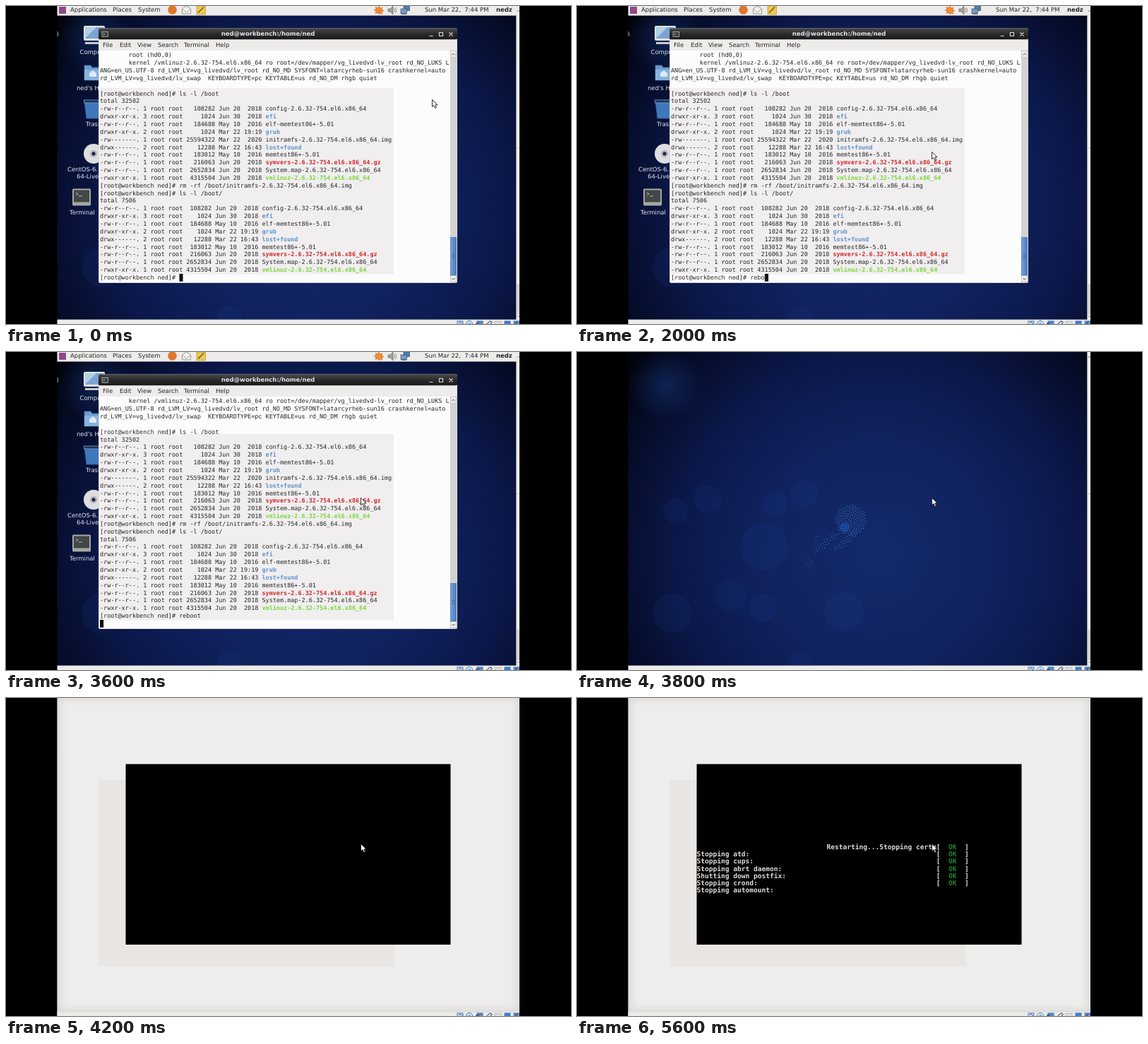
These frames come from a looping animation (800x450 px, 8 s). An HTML page:

```html
<!DOCTYPE html>
<html lang="en">
<head>
<meta charset="utf-8">
<title>Reboot from a terminal</title>
<style>
  html, body { margin: 0; width: 100%; height: 100%; overflow: hidden; background: #000; }
  svg { display: block; width: 800px; height: 450px; }
  text { white-space: pre; text-rendering: geometricPrecision; }
  .ui { font: 8.48px "DejaVu Sans", sans-serif; fill: #262626; }
  .label { fill: #e4e6ee; }
  .bold { font-weight: bold; }
  .term { font: 8.488px "DejaVu Sans Mono", monospace; fill: #262626; }
  .dir { fill: #5d95cc; font-weight: bold; }
  .gz { fill: #d02a2a; font-weight: bold; }
  .exe { fill: #78d838; font-weight: bold; }
  .tty { font: bold 9.55px "DejaVu Sans Mono", monospace; fill: #dcdcdc; }
  .ok { fill: #23802a; }
</style>
</head>
<body>
<svg id="stage" viewBox="0 0 800 450" xmlns="http://www.w3.org/2000/svg">
  <defs>
    <radialGradient id="sky" gradientUnits="userSpaceOnUse" cx="425" cy="285" r="430">
      <stop offset="0" stop-color="#142a6c"/>
      <stop offset=".35" stop-color="#112360"/>
      <stop offset=".65" stop-color="#0b184a"/>
      <stop offset=".88" stop-color="#050c28"/>
      <stop offset="1" stop-color="#02040f"/>
    </radialGradient>
    <radialGradient id="glow">
      <stop offset="0" stop-color="#1d4596" stop-opacity=".4"/>
      <stop offset="1" stop-color="#1d4596" stop-opacity="0"/>
    </radialGradient>
    <linearGradient id="bar" x2="0" y2="1">
      <stop offset="0" stop-color="#4a4a4a"/>
      <stop offset=".5" stop-color="#2b2b2b"/>
      <stop offset="1" stop-color="#181818"/>
    </linearGradient>
    <linearGradient id="thumb">
      <stop offset="0" stop-color="#74a2dc"/>
      <stop offset="1" stop-color="#467abf"/>
    </linearGradient>
    <pattern id="cells" patternUnits="userSpaceOnUse" x="169.5" y="93.5" width="5.75" height="10.2">
      <rect x="3.8" width="1" height="10.2" fill="#606060"/>
      <rect x="2.4" y="7.2" width="2" height="2" fill="#787878"/>
    </pattern>
    <filter id="soft"><feGaussianBlur stdDeviation="6"/></filter>
    <clipPath id="view"><rect x="72.5" width="654.5" height="450"/></clipPath>
  </defs>
  <g clip-path="url(#view)">
    <g id="wallpaper"></g>
    <g id="desktop"></g>
    <g id="page"></g>
    <g id="status"></g>
    <path id="mouse" d="M0 0v10.2l2.4-2.1 1.8 4 1.9-.8-1.8-3.9h3.3z" fill="#fff" stroke="#1a1a1a" stroke-width=".9"/>
  </g>
</svg>
<script>
const $ = id => document.getElementById(id);
const LOOP = 8000, STEP = 200;
const ROW = 10.85, CELL = 5.11, LEFT = 133, ROWS = 30;

const rect = (x, y, w, h, fill, more = '') =>
  `<rect x="${x}" y="${y}" width="${w}" height="${h}" fill="${fill}" ${more}/>`;
const disc = (x, y, r, fill, more = '') =>
  `<circle cx="${x}" cy="${y}" r="${r}" fill="${fill}" ${more}/>`;
const path = (d, stroke, width = 1, fill = 'none') =>
  `<path d="${d}" stroke="${stroke}" stroke-width="${width}" fill="${fill}"/>`;
const text = (x, y, s, cls = 'ui', more = '') =>
  `<text x="${x}" y="${y}" class="${cls}" ${more}>${s}</text>`;
const show = (id, on) => $(id).style.display = on ? '' : 'none';

function wallpaper() {
  const bokeh = [[322, 200, 20], [265, 275, 34], [185, 208, 20], [280, 215, 18], [262, 362, 20],
    [378, 367, 28], [135, 370, 28], [316, 442, 18], [140, 225, 18], [218, 345, 22]];
  let s = rect(72, 0, 656, 450, 'url(#sky)') + disc(125, 45, 52, 'url(#glow)');
  for (const [x, y, r] of bokeh) s += disc(x, y, r, '#2450a4', 'opacity=".1"');
  // ball of dots with a trail to the lower left
  for (let i = 0; i < 150; i++) {
    const r = 22 * Math.sqrt(i / 150), a = i * 2.39996;
    s += disc((388 + r * Math.cos(a)).toFixed(1), (238 + r * Math.sin(a)).toFixed(1), .6, '#4f93d8');
  }
  s += disc(379, 248, 7, '#1c6ad0', 'opacity=".35"');
  for (let i = 0; i < 62; i++) {
    const u = (i * .618) % 1, v = (i * .755 + .3) % 1;
    const x = 336 + 62 * u, y = 268 - 8 * u + (v - .35) * 24;
    s += disc(x.toFixed(1), y.toFixed(1), .6, '#4585cc');
  }
  for (let i = 0; i < 8; i++) s += disc(323 + (i * 5) % 12, 292 + i * 2, .6, '#3f7cc2');
  return s;
}

function icons() {
  return rect(110, 28, 30, 21, '#dfe3e6', 'rx="2"') + rect(112, 30, 26, 16, '#7ba4d2') +
    path('M112 46L128 30H112z', 'none', 0, '#b4cee8') + rect(112, 51, 28, 3, '#c8caca') +
    text(104.5, 67.5, 'Computer', 'ui label') +
    path('M111 84h9l2 3h14v18h-25z', '#3f70a6', .8, '#6c9dd0') + rect(111, 90, 24, 15, '#86b2de') +
    path('M118 100v-5l5-4 5 4v5z', 'none', 0, '#dce9f6') +
    text(100, 118.5, "ned's Home", 'ui label') +
    path('M111 135h25l-3 24h-19z', '#3a6ca6', .8, '#3d78ba') +
    rect(110.5, 133, 26, 4, '#1c3458', 'stroke="#7ba2cc" stroke-width=".8"') +
    text(113, 169.5, 'Trash', 'ui label') +
    disc(124, 209, 14, '#dedede') + disc(124, 209, 5, '#b4b4b4') + disc(124, 209, 2.5, '#14235c') +
    text(87, 233.5, 'CentOS-6.10-x86_', 'ui label') + text(100, 244, '64-LiveDVD', 'ui label') +
    rect(94, 258.5, 26, 24, '#a6a8a2', 'rx="1.5"') + rect(96, 260.5, 22, 17, '#424848') +
    path('M99 264l3 2-3 2M103 269h5', '#d0d0d0', .8) +
    text(90, 294.5, 'Terminal', 'ui label') +
    path('M72.5 36v7l2-2z', '#ddd', .6, '#111');
}

function panel() {
  return rect(72, 0, 651, 13, '#edeceb') + rect(72, 13, 651, .8, '#b5b3b0') +
    rect(75, 1, 10, 10, '#94468c') +
    text(91, 8.2, 'Applications') + text(151, 8.2, 'Places') + text(187, 8.2, 'System') +
    disc(235.5, 5.5, 6.3, '#e0762a') +
    path('M249.5 4l6-4 6 4v7h-12z', '#84847e', .8, '#f2f1ea') + path('M250 5l5.5 4 5.5-4', '#94948c', .8) +
    rect(270, 0, 12.5, 12, '#ecc94e', 'stroke="#b08e26" stroke-width=".6"') +
    path('M272 9.5l8-8', '#7a5426', 1.6) +
    path('M528 0l1.6 3 3.4-1-1 3.2 3 1.3-3 1.5.8 3.3-3.3-1L528 12l-1.5-2.5-3.5 1 1-3.3-3-1.4 3-1.3-1-3 3.4 1z', '#c85a14', .5, '#f08a30') +
    path('M541 4h3l4-4v12l-4-4h-3z', '#5a5a5a', .6, '#a0a09c') + path('M549.5 3q2 3 0 6M551.5 2q2.5 4 0 8', '#777', .8) +
    rect(563, 0, 8.5, 6.5, '#4c7fb8', 'stroke="#555" stroke-width=".8"') +
    rect(559, 4, 8.5, 6.5, '#6b9dd2', 'stroke="#555" stroke-width=".8"') + rect(560, 11, 7, 1, '#777') +
    text(593, 8.2, 'Sun Mar 22,  7:44 PM') + text(694, 8.2, 'nedz', 'ui bold');
}

function frame() {
  const menu = { File: 137, Edit: 161, View: 186, Search: 215, Terminal: 252, Help: 297 };
  return rect(131, 31.5, 508, 360.5, '#d8d8d8', 'rx="2"') + rect(131, 31.5, 508, 16, 'url(#bar)', 'rx="2"') +
    rect(136, 36.5, 8.5, 7, '#3a4040', 'stroke="#b8b8b8" stroke-width=".8"') + path('M138 39l1.5 1-1.5 1', '#eee', .7) +
    text(371, 42.3, 'ned@workbench:/home/ned', 'ui bold label', 'text-anchor="middle"') +
    path('M599.5 42.5h5M613.5 37.5h5v5h-5zM627.5 37.5l5 5m0-5l-5 5', '#dcdcdc', 1.1) +
    rect(132, 47.5, 506, 15.5, '#edeceb') +
    Object.entries(menu).map(([s, x]) => text(x, 58, s)).join('') +
    rect(132, 63, 497, 328, '#fdfcfd') + rect(132.5, 116, 416.5, 263.5, '#f1eef0') +
    rect(629, 63, 9, 328, '#d5d3d1') +
    rect(629.5, 63.5, 8, 9, '#f0efee', 'stroke="#aaa" stroke-width=".5"') +
    rect(629.5, 381.5, 8, 9, '#f0efee', 'stroke="#aaa" stroke-width=".5"') +
    path('M631.5 69.5l2-2.5 2 2.5M631.5 385l2 2.5 2-2.5', '#444', .9) +
    rect(629.5, 327.5, 8, 53.5, 'url(#thumb)', 'stroke="#3d6ca8" stroke-width=".6"') +
    path('M631.5 351.5h4m-4 2.5h4m-4 2.5h4', '#2f5c98', .7) +
    '<g id="lines"></g>' + rect(0, 0, CELL, 10.8, '#111', 'id="block"');
}

const FILES = [
  ['-rw-r--r--. 1', 108282, 'Jun 20  2018', 'config-2.6.32-754.el6.x86_64'],
  ['drwxr-xr-x. 3', 1024, 'Jun 30  2018', 'efi', 'dir'],
  ['-rw-r--r--. 1', 184688, 'May 10  2016', 'elf-memtest86+-5.01'],
  ['drwxr-xr-x. 2', 1024, 'Mar 22 19:19', 'grub', 'dir'],
  ['-rw-------. 1', 25594322, 'Mar 22  2020', 'initramfs-2.6.32-754.el6.x86_64.img'],
  ['drwx------. 2', 12288, 'Mar 22 16:43', 'lost+found', 'dir'],
  ['-rw-r--r--. 1', 183012, 'May 10  2016', 'memtest86+-5.01'],
  ['-rw-r--r--. 1', 216063, 'Jun 20  2018', 'symvers-2.6.32-754.el6.x86_64.gz', 'gz'],
  ['-rw-r--r--. 1', 2652834, 'Jun 20  2018', 'System.map-2.6.32-754.el6.x86_64'],
  ['-rwxr-xr-x. 1', 4315504, 'Jun 20  2018', 'vmlinuz-2.6.32-754.el6.x86_64', 'exe']
];
const PROMPT = '[root@workbench ned]# ';
const list = (files, width) => files.map(([mode, size, date, name, cls = '']) =>
  `${mode} root root ${String(size).padStart(width)} ${date} <tspan class="${cls}">${name}</tspan>`);
const HISTORY = [
  '        root (hd0,0)',
  '        kernel /vmlinuz-2.6.32-754.el6.x86_64 ro root=/dev/mapper/vg_livedvd-lv_root rd_NO_LUKS L',
  'ANG=en_US.UTF-8 rd_LVM_LV=vg_livedvd/lv_root rd_NO_MD SYSFONT=latarcyrheb-sun16 crashkernel=auto',
  'rd_LVM_LV=vg_livedvd/lv_swap  KEYBOARDTYPE=pc KEYTABLE=us rd_NO_DM rhgb quiet',
  '',
  PROMPT + 'ls -l /boot', 'total 32502', ...list(FILES, 8),
  PROMPT + 'rm -rf /boot/initramfs-2.6.32-754.el6.x86_64.img',
  PROMPT + 'ls -l /boot/', 'total 7506', ...list(FILES.filter(f => f[1] < 1e7), 7)
];

function drawTerminal(typed, entered) {
  const rows = [...HISTORY, PROMPT + typed];
  if (entered) rows.push('');
  const cols = rows[rows.length - 1].length;
  $('lines').innerHTML = rows.slice(-ROWS)
    .map((s, i) => text(LEFT, (72.3 + i * ROW).toFixed(2), s, 'term')).join('');
  $('block').setAttribute('x', LEFT + cols * CELL);
  $('block').setAttribute('y', 379);
}

function page() {
  return rect(72, 0, 656, 450, '#eeedeb') +
    '<rect x="72" y="-3" width="656" height="449" fill="none" stroke="#cfcfcf" stroke-width="7" filter="url(#soft)"/>' +
    rect(131.5, 116, 418.5, 263.5, '#e8e5e2') +
    rect(169.5, 93.5, 460, 255.5, '#000') +
    `<g id="garble">${rect(169.5, 93.5, 460, 255.5, 'url(#cells)')}${rect(169.5, 101, 5.75, 1.5, '#ddd')}</g>` +
    '<g id="log"></g>';
}

const JOBS = ['Restarting...Stopping certm', 'Stopping atd:', 'Stopping cups:', 'Stopping abrt daemon:',
  'Shutting down postfix:', 'Stopping crond:', 'Stopping automount:'];

function drawLog(count) {
  $('log').innerHTML = JOBS.slice(0, count).map((job, i) => {
    const y = (214 + i * 10.2).toFixed(1);
    const done = i < count - 1 ? text(508.75, y, '[  <tspan class="ok">OK</tspan>  ]', 'tty') : '';
    return text(i ? 169.5 : 353.5, y, job, 'tty') + done;
  }).join('');
}

function status() {
  const box = (x, fill) => rect(x, 446, 8, 6, fill, 'stroke="#3c6ea8" stroke-width=".9"');
  return rect(72, 444, 656, 6, '#ebebea') + rect(72, 443.6, 656, .7, '#d2d2d0') +
    box(639, '#cfe0f2') + path('M641 449l2-2 3 3', '#2d66a8', 1) +
    disc(656, 450, 4.5, '#d4e4f2', 'stroke="#4a80b8" stroke-width="1"') + disc(656, 450, 1.5, '#4a80b8') +
    box(667, '#5b8cc4') + path('M665 449h5', '#234f88', 1.4) +
    path('M680 451l4-4q3-2 4 1l-3 3', '#5a7088', 1.3) +
    rect(692, 446.5, 9, 5, '#dedede', 'stroke="#b0b0b0" stroke-width=".8"') +
    box(706, '#3f7fd8') + box(719, '#6c98cc') + path('M721 450l3-3', '#1c3f78', 1.2);
}

function sidebar() {
  return rect(722.5, 0, 5, 444, '#f1f1f0') + rect(722.5, 0, .7, 444, '#c4c4c4') +
    rect(723.5, 200, 4, .8, '#c0c0c0') + rect(723, 393, 4, 43, '#d4d4d4') +
    path('M724 438l1.5 2 1.5-2M724 8l1.5-2 1.5 2', '#777', .8);
}

$('wallpaper').innerHTML = wallpaper() + sidebar();
$('desktop').innerHTML = icons() + panel() + frame();
$('page').innerHTML = page();
$('status').innerHTML = status();

const clamp = (v, lo, hi) => Math.min(hi, Math.max(lo, v));

function draw(t) {
  const u = clamp(t / 1200, 0, 1), k = u * u * (3 - 2 * u);
  $('mouse').setAttribute('transform', `translate(${603.5 - 101 * k} ${132.5 + 74 * k})`);
  show('desktop', t < 3800);
  show('page', t >= 4000);
  show('garble', t < 4200);
  drawTerminal('reboot'.slice(0, clamp((t - 1200) / STEP, 0, 6)), t >= 2800);
  drawLog(clamp((t - 4200) / STEP, 0, JOBS.length));
}

let last = -1;
function tick() {
  const t = Math.floor(performance.now() % LOOP / STEP) * STEP;
  if (t !== last) draw(last = t);
  requestAnimationFrame(tick);
}
tick();
</script>
</body>
</html>
```
